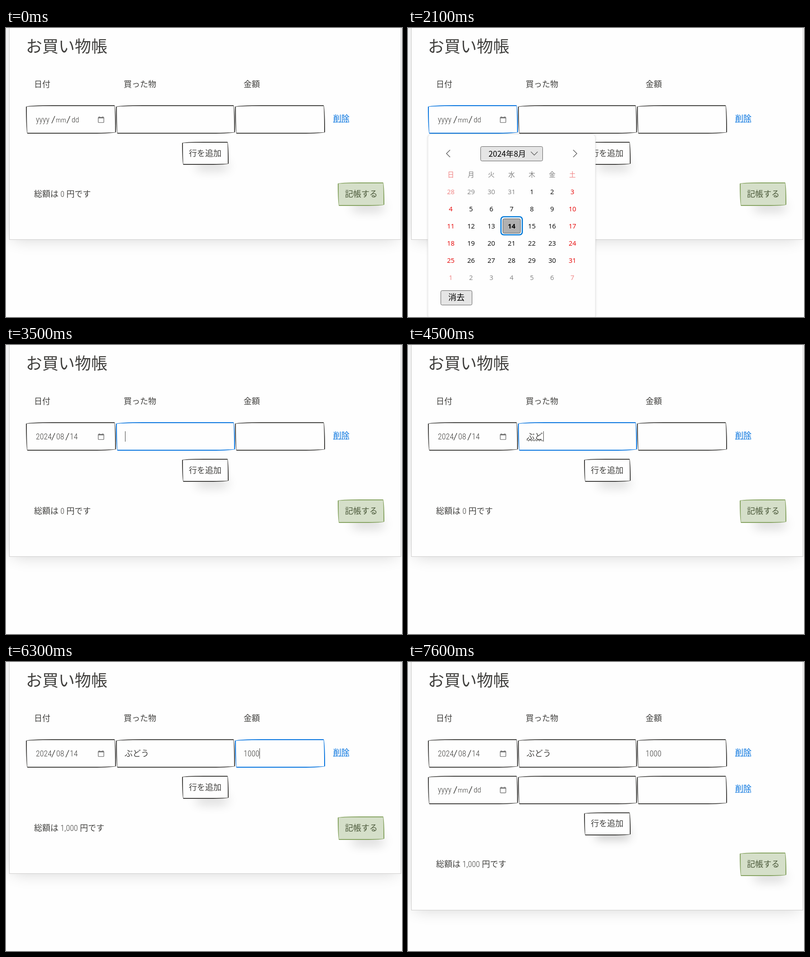
An HTML page for the animation above (8000 ms loop, 875 by 640 pixels).

```html
<!DOCTYPE html>
<html lang="ja">
<head>
<meta charset="utf-8">
<title>お買い物帳</title>
<style>
html, body { margin: 0; width: 100%; height: 100%; overflow: hidden; background: #fefefe; }
#stage { position: relative; width: 875px; height: 640px; overflow: hidden; }
#stage > * { position: absolute; box-sizing: border-box; }
svg { left: 0; top: 0; width: 875px; height: 640px; }
text { font-family: 'Noto Sans CJK JP', 'Noto Sans CJK', sans-serif; font-weight: 350; fill: #41403e; }
.num { font-family: 'Roboto Condensed', Roboto, 'Noto Sans CJK JP', sans-serif; font-stretch: condensed; font-weight: 350; }
.paper { left: 7px; top: -100px; width: 866px; background: #fefefe; border: 1px solid #cdcccb; box-shadow: -1px 5px 35px -9px rgba(0,0,0,.2); }
.box { border: 2px solid #41403e; border-radius: 255px 15px 225px 15px / 15px 225px 15px 255px; background: #fefefe; }
.focus { border-color: #0071de; }
.ok { border-color: #86a361; background: #d5dfc9; }
.link { fill: #0071de; }
.day { font-family: 'Open Sans', 'Noto Sans', 'Noto Sans CJK JP', sans-serif; font-weight: 400; text-anchor: middle; }
</style>
</head>
<body>
<div id="stage"></div>
<script>
const stage = document.getElementById('stage');
const LOOP = 8000, STEP = 100, ROW = 80.4;

// Each entry holds from its time until the next one.
const ITEM = [[0, ''], [4000, 'ｂ'], [4100, 'ぶ'], [4300, 'ぶｄ'], [4500, 'ぶど'], [4700, 'ぶどう']];
const PRICE = [[0, ''], [5700, '1'], [6000, '10'], [6200, '100'], [6300, '1000']];
const FOCUS = [[0, -1], [1000, 0], [3500, 1], [5200, 2], [7500, -1]];
const at = (list, t) => list.filter(e => e[0] <= t).pop()[1];
const within = (t, a, b) => t >= a && t < b;

const text = (x, y, s, size = 18, attrs = '') =>
  `<text x="${x}" y="${y}" font-size="${size}" ${attrs}>${s}</text>`;
const num = (x, y, s, size = 18) => text(x, y, s, size, 'class="num"');
const line = (d, color = '#41403e', width = 1, attrs = '') =>
  `<path d="${d}" fill="none" stroke="${color}" stroke-width="${width}" ${attrs}/>`;
const rect = (x, y, w, h, r, fill, stroke = 'none', width = 1) =>
  `<rect x="${x}" y="${y}" width="${w}" height="${h}" rx="${r}" fill="${fill}" stroke="${stroke}" stroke-width="${width}"/>`;
const box = (x, y, w, h, cls = '', style = '') =>
  `<div class="box ${cls}" style="left:${x}px;top:${y}px;width:${w}px;height:${h}px;${style}"></div>`;
const svg = (body, style = '') => `<svg viewBox="0 0 875 640" style="${style}">${body}</svg>`;

const inputs = (y, focus) => [[44, 199], [243, 263], [506, 199]]
  .map(([x, w], i) => box(x, y, w, 63, i === focus ? 'focus' : '')).join('');

function rowText(y, filled, item, price, iconColor) {
  const date = filled
    ? num(66, y + 38, '2024') + num(111, y + 38, '08') + num(141, y + 38, '14')
    : num(66, y + 38, 'yyyy') + num(110, y + 38, 'mm', 15) + num(145, y + 38, 'dd', 17);
  const slash = x => line(`M${x} ${y + 40}l7 -16`, '#41403e', 1.4);
  const icon = rect(203.8, y + 26.8, 12.4, 11.6, 1.5, 'none', iconColor, 1.4) +
    line(`M203.5 ${y + 28}h13M206 ${y + 25}v2M214 ${y + 25}v2`, iconColor, 2);
  return date + slash(101) + slash(filled ? 132 : 134.5) + icon +
    text(262, y + 37.5, item) + num(525, y + 38, price) +
    text(723, y + 35.5, '削除', 18, 'class="link"') +
    line(`M723 ${y + 37.5}h36`, '#0071de', 1.3, 'stroke-dasharray="2 1"');
}

function calendar(t) {
  const fade = t < 1300 ? [.2, -6] : t < 1400 ? [.75, -2] : [1, 0];
  const hover = t >= 2100;
  let s = rect(44, 235, 370, 410, 8, '#fefefe', '#e4e4e4') +
    line('M93 270l-8 8 8 8M365 270l8 8 -8 8', '#666', 1.5) +
    rect(160.5, 262.5, 137, 32, 3, '#e5e5e5', '#606060') +
    text(178, 284.5, '2024年8月', 17.3, 'style="font-weight:500;fill:#000"') +
    line('M271.500 274l7.500 7.500 7.500 -7.500', '#666', 1.4) +
    rect(72.5, 581.5, 69, 32, 3, '#e5e5e5', '#606060') +
    text(89, 603, '消去', 18, 'style="fill:#000"') +
    rect(205.5, 418, 47, 40, 6, '#fff', '#0078d7', 2.6) +
    rect(209.5, 422.5, 39, 32, 3, hover ? '#b0b0b0' : '#cecece', hover ? '#555' : '#999');
  const cell = (col, y, label, color, bold) => text(94.5 + 44.8 * col, y, label, 14.6,
    `class="day" style="fill:${color};${bold ? 'font-weight:700' : ''}"`);
  [...'日月火水木金土'].forEach((d, i) => s += cell(i, 330, d, i % 6 ? '#808080' : '#f08080'));
  for (let i = 0; i < 42; i++) {
    const n = i - 3, inside = n > 0 && n < 32, weekend = i % 7 % 6 === 0;
    const color = weekend ? (inside ? '#e60000' : '#f08080') : (inside ? '#000' : '#808080');
    s += cell(i % 7, 368 + 38 * Math.floor(i / 7), (n + 30) % 31 + 1, color, n === 14);
  }
  return svg(s, `opacity:${fade[0]};transform:translateY(${fade[1]}px);filter:drop-shadow(0 0 2px rgba(0,0,0,.12))`);
}

// Pointer rests on the add button, which then slips away below it.
function hoverAmount(t) {
  if (t < 7100) return 0;
  if (t < 7500) return 1 - (1 - Math.min(1, (t - 7020) / 235)) ** 2;
  return (1 - (Math.min(t, 7600) - 7480) / 235) ** 2;
}

function caret(t, focus, item, price) {
  if (focus < 1 || within(t, 6700, 7200)) return '';
  const x = focus === 1 ? 263 + 18 * item.length : 526 + 8.7 * price.length;
  return line(`M${Math.floor(x) + .5} 191v23`, '#41403e', 1);
}

function draw(t) {
  const added = t >= 7500, dy = added ? ROW : 0;
  const focus = at(FOCUS, t), item = at(ITEM, t), price = at(PRICE, t);
  const h = hoverAmount(t), mix = (a, b) => a + (b - a) * h;
  const shadow = (x, y, blur, spread, alpha) =>
    `box-shadow:${x}px ${y}px ${blur}px ${spread}px rgba(0,0,0,${alpha});`;
  const addShadow = shadow(mix(15, 2), mix(28, 8), mix(25, 8), mix(-18, -5), mix(.2, .3));
  const icon = within(t, 700, 1300) ? '#000' : '#777';

  let words = text(44, 53.5, 'お買い物帳', 36) +
    text(62, 130.5, '日付') + text(260, 130.5, '買った物') + text(525, 130.5, '金額') +
    rowText(171, t >= 2600, item, price, icon) +
    text(404, 283.5 + dy + 2 * h, '行を追加') +
    text(62, 373.5 + dy, `総額は<tspan class="num"> ${(+price).toLocaleString('en-US')} </tspan>円です`, 18, 'word-spacing=".3"') +
    text(749, 373.5 + dy, '記帳する', 18, 'style="fill:#4a5839"') +
    caret(t, focus, item, price);
  if (added) words += rowText(171 + ROW, false, '', '', '#777');
  if (within(t, 4000, 5000))
    words += line('M262 211' + 'q1.5 -3 3 0t3 0'.repeat(3 * item.length), '#41403e', 1.2);

  stage.innerHTML =
    `<div class="paper" style="height:${569.2 + dy}px"></div>` +
    inputs(171.3, focus) + (added ? inputs(171.3 + ROW, -1) : '') +
    box(389, 252.2 + dy + 2 * h, 103, 51, '', addShadow) +
    box(733, 342 + dy, 103, 52, 'ok', shadow(15, 28, 25, -18, .2)) +
    svg(words) + (within(t, 1200, 2600) ? calendar(t) : '');
}

let last = -1;
const start = performance.now();
function tick() {
  const t = Math.floor((performance.now() - start) % LOOP / STEP) * STEP;
  if (t !== last) draw(last = t);
  requestAnimationFrame(tick);
}
tick();
</script>
</body>
</html>
```
